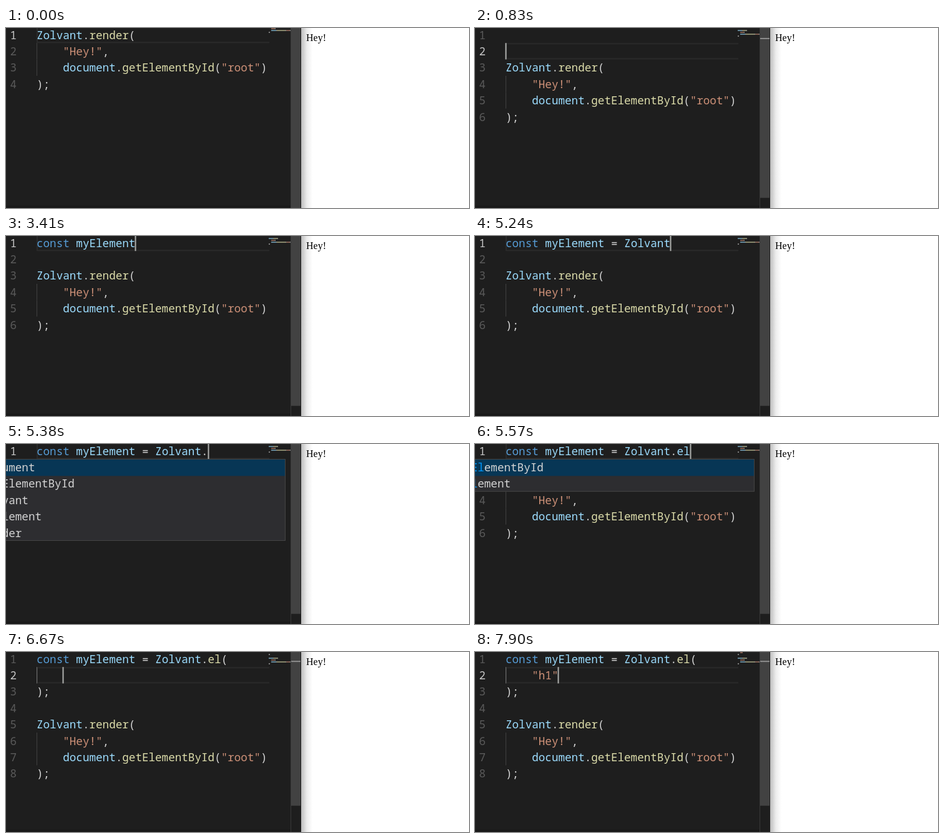
Recreate the animation shown at these times as an HTML page. Size 742 by 290 pixels, loop 8 s.

```html
<!DOCTYPE html>
<html lang="en">
<head>
<meta charset="utf-8">
<title>Typing in a code editor</title>
<style>
  html, body { margin: 0; width: 100%; height: 100%; overflow: hidden; background: #fff; }
  svg { display: block; }
  text { font: 17.6px "Noto Sans Mono", monospace; white-space: pre; }
  .page { font: 16px "Liberation Serif", serif; }
</style>
</head>
<body>
<svg width="742" height="290" viewBox="0 0 742 290">
  <defs>
    <linearGradient id="shade">
      <stop offset="0" stop-color="#bcbcbc"/>
      <stop offset=".5" stop-color="#ececec"/>
      <stop offset="1" stop-color="#fff"/>
    </linearGradient>
  </defs>
  <rect width="742" height="290" fill="#fff"/>
  <rect x="473" width="18" height="290" fill="url(#shade)"/>
  <text class="page" x="481" y="21" fill="#000">Hey!</text>
  <rect width="473" height="290" fill="#1e1e1e"/>
  <rect y="286" width="456" height="4" fill="#191919"/>
  <g id="editor"></g>
</svg>
<script>
const LOOP = 8000, CHAR = 10.56, LINE = 26.4, LEFT = 49, TOP = -2.2;
const LIB = "Zolvant";
const CALL = `${LIB}.render(\n    "Hey!",\n    document.getElementById("root")\n);`;
const WORDS = ["document", "getElementById", LIB, "myElement", "render"];
const DECL = `const myElement = ${LIB}.el(`;
const GAP = "\n\n";
const TOKEN = /("[^"]*"?)|\b(const)\b|(\w+(?=\())|(\w+)|[^\w"]+/g;
const COLORS = ["#ce9178", "#569cd6", "#dcdcaa", "#9cdcfe"];
const PLAIN = "#d4d4d4";

// Each step is [time, text above the call]; "|" is the caret, "¦" a hidden one.
const steps = [
  [0, "¦"], [230, "|"], [550, "\n|"], [690, "\n\n|"], [830, "\n|\n"], [970, "|" + GAP]
];
const type = (before, chars, times, after = GAP) =>
  times.forEach((t, i) => steps.push([t, before + chars.slice(0, i + 1) + "|" + after]));

type("", "const ", [1330, 1400, 1470, 1830, 1920, 2020]);
type("const ", "myElement =", [2400, 2480, 2640, 2720, 2810, 2900, 2990, 3120, 3270, 3590, 3820]);
type("const myElement =", " ", [3960]);
steps.push([4280, "const myElement = ¦" + GAP]);
type("const myElement = ", LIB + ".el",
  [4550, 4660, 4770, 4890, 5000, 5120, 5240, 5380, 5520, 5570]);
steps.push(
  [5620, DECL + "|)" + GAP],
  [5900, DECL + ")|" + GAP],
  [6080, DECL + ");|" + GAP],
  [6350, DECL + ")|;" + GAP],
  [6450, DECL + "|);" + GAP],
  [6540, DECL + "\n    |\n);" + GAP]
);
type(DECL + "\n    ", '"', [7030], '"\n);' + GAP);
type(DECL + '\n    "', "h1", [7320, 7470], '"\n);' + GAP);
type(DECL + '\n    "h1', '"', [7760], "\n);" + GAP);

const between = (t, a, b) => t >= a && t < b;
const colX = col => LEFT + col * CHAR;
const rowY = row => TOP + row * LINE;
const rect = (x, y, w, h, fill, more = "") =>
  `<rect x="${x}" y="${y}" width="${w}" height="${h}" fill="${fill}" ${more}/>`;
const text = (x, row, str, fill) =>
  `<text x="${x}" y="${rowY(row) + 19.7}" fill="${fill}">${str}</text>`;

function codeLine(line, row) {
  let out = "";
  for (const m of line.matchAll(TOKEN)) {
    const kind = m.slice(1).findIndex(Boolean);
    const color = COLORS[kind] || PLAIN;
    if (!m[0].trim()) continue;
    out += text(colX(m.index), row, m[0], color);
    const pad = m[0].length - m[0].trimStart().length;
    out += rect(421 + m.index + pad, row * 3 - 3, m[0].trim().length, 2, color, 'opacity=".55"');
  }
  return out;
}

function popup(query) {
  const words = WORDS.filter(w => w.toLowerCase().includes(query));
  let out = rect(-60.5, 24.5, 508, words.length * LINE - 1, "#2d2d30", 'stroke="#454545"');
  out += rect(-60, 25, 507, LINE, "#073655");
  words.forEach((word, i) => {
    const at = query ? word.toLowerCase().indexOf(query) : 0;
    const end = at + query.length;
    out += text(-38, i + 1, word.slice(0, at) +
      `<tspan fill="#0097fb">${word.slice(at, end)}</tspan>` + word.slice(end), PLAIN);
  });
  return out;
}

function brackets() {
  const box = col => rect(colX(col) + .3, -1.5, CHAR - .6, 24.5, "#006400",
    'fill-opacity=".15" stroke="#888"');
  return box(DECL.length - 1) + box(DECL.length) + rect(461, 0, 6, 17, "#8a958a");
}

function squiggle() {
  const x = colX(LIB.length);
  return `<path d="M${x} 75l2.6-3 2.6 3 2.6-3 2.6 3" fill="none" stroke="#f14c4c" stroke-width="1.5"/>`
    + rect(467, 35, 5, 6, "#d13b3b");
}

function draw(t) {
  const head = steps.findLast(step => step[0] <= t)[1];
  const caretAt = head.search(/[|¦]/);
  const above = head.slice(0, caretAt).split("\n");
  const row = above.length - 1, col = above[row].length;
  const lines = (head.replace(/[|¦]/, "") + CALL).split("\n");
  const extent = 371 + (lines.length - 1) * LINE;
  const y = rowY(row);

  let out = `<path d="M422 ${y + 1}H50V${y + LINE - 1}H422" fill="none" stroke="#2a2a2a" stroke-width="2"/>`;
  out += rect(456, 0, 1, 290, "#383838") + rect(457, 0, 15, 371 * 371 / extent, "#424242");
  out += rect(457, row * LINE * 371 / extent - 3.5, 15, 2, "#8c8c8c");

  lines.forEach((line, i) => {
    const active = i === row;
    out += text(6.5, i, i + 1, active ? "#c6c6c6" : "#5a5a5a");
    if (line.startsWith("    ")) out += rect(49, rowY(i), 1, LINE, active ? "#707070" : "#404040");
    out += codeLine(line, i);
  });

  if (between(t, 2250, 2560)) out += squiggle();
  if (between(t, 5850, 6080) || between(t, 6350, 6540)) out += brackets();
  if (head[caretAt] === "|") out += rect(Math.round(colX(col)) - .5, y, 2, LINE, "#aeafad");
  if (between(t, 5380, 5620)) out += popup(above[0].split(".")[1]);
  return out;
}

const editor = document.getElementById("editor");
let shown = "";
const start = performance.now();
function tick() {
  const next = draw((performance.now() - start) % LOOP);
  if (next !== shown) editor.innerHTML = shown = next;
  requestAnimationFrame(tick);
}
tick();
</script>
</body>
</html>
```
